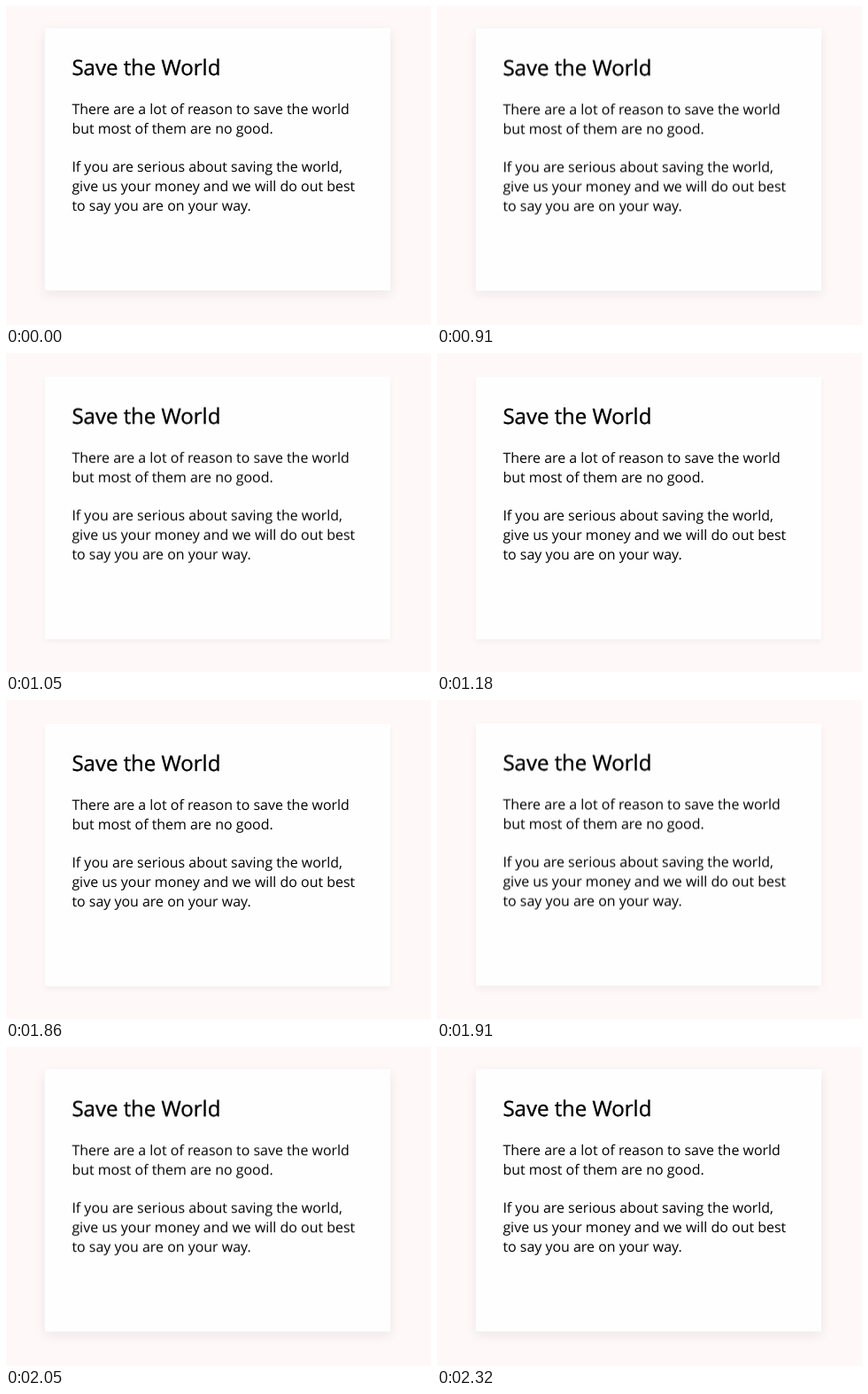
These frames come from a looping animation (480x360 px, 2550 ms). An HTML page:

```html
<!DOCTYPE html>
<html lang="en">
<head>
<meta charset="utf-8">
<title>Save the World</title>
<style>
  html, body { margin: 0; width: 100%; height: 100%; overflow: hidden; background: #fef8f9; }
  #card {
    position: absolute; left: 44px; top: 25px; width: 389.5px; height: 296px;
    border-radius: 1px; background: #fffefe; will-change: transform;
  }
  svg {
    display: block; width: 100%; height: 100%; overflow: visible;
    font: 15.95px "Open Sans", sans-serif; text-rendering: geometricPrecision;
  }
  .title { font-size: 24px; stroke: #000; stroke-width: .35px; }
</style>
</head>
<body>
<div id="card">
  <svg>
    <text class="title" x="30.4" y="53">Save the World</text>
    <text x="30.4" y="97">There are a lot of reason to save the world</text>
    <text x="30.4" y="118.8">but most of them are no good.</text>
    <text x="30.4" y="162.4">If you are serious about saving the world,</text>
    <text x="30.4" y="184.2">give us your money and we will do out best</text>
    <text x="30.4" y="206">to say you are on your way.</text>
  </svg>
</div>
<script>
const LOOP = 2550, FPS = 22, DURATION = 300;
const PRESS_AT = 865, RELEASE_AT = 1850;
const card = document.getElementById('card');

const bezier = (a, b, u) => 3 * a * u * (1 - u) ** 2 + 3 * b * u * u * (1 - u) + u ** 3;

// The CSS "ease" curve, solved by bisection.
function ease(x) {
  if (x <= 0) return 0;
  if (x >= 1) return 1;
  let low = 0, high = 1;
  for (let i = 0; i < 24; i++) {
    const mid = (low + high) / 2;
    if (bezier(.25, .25, mid) < x) low = mid; else high = mid;
  }
  return bezier(.1, 1, low);
}

const mix = (a, b, k) => a + (b - a) * k;

function draw(ms) {
  const time = Math.floor((ms % LOOP + 5) * FPS / 1000) * 1000 / FPS;
  const sunk = time < 905 ? 0
    : ease((time - PRESS_AT) / DURATION) - ease((time - RELEASE_AT) / DURATION);
  card.style.transform = `translateY(${2 * sunk}px)`;
  card.style.boxShadow =
    `0 ${mix(4, 3, sunk)}px ${mix(14, 6, sunk)}px rgba(20, 20, 40, ${mix(.08, .045, sunk)})`;
}

const start = performance.now();
function tick() {
  draw(performance.now() - start);
  requestAnimationFrame(tick);
}
tick();
</script>
</body>
</html>
```
